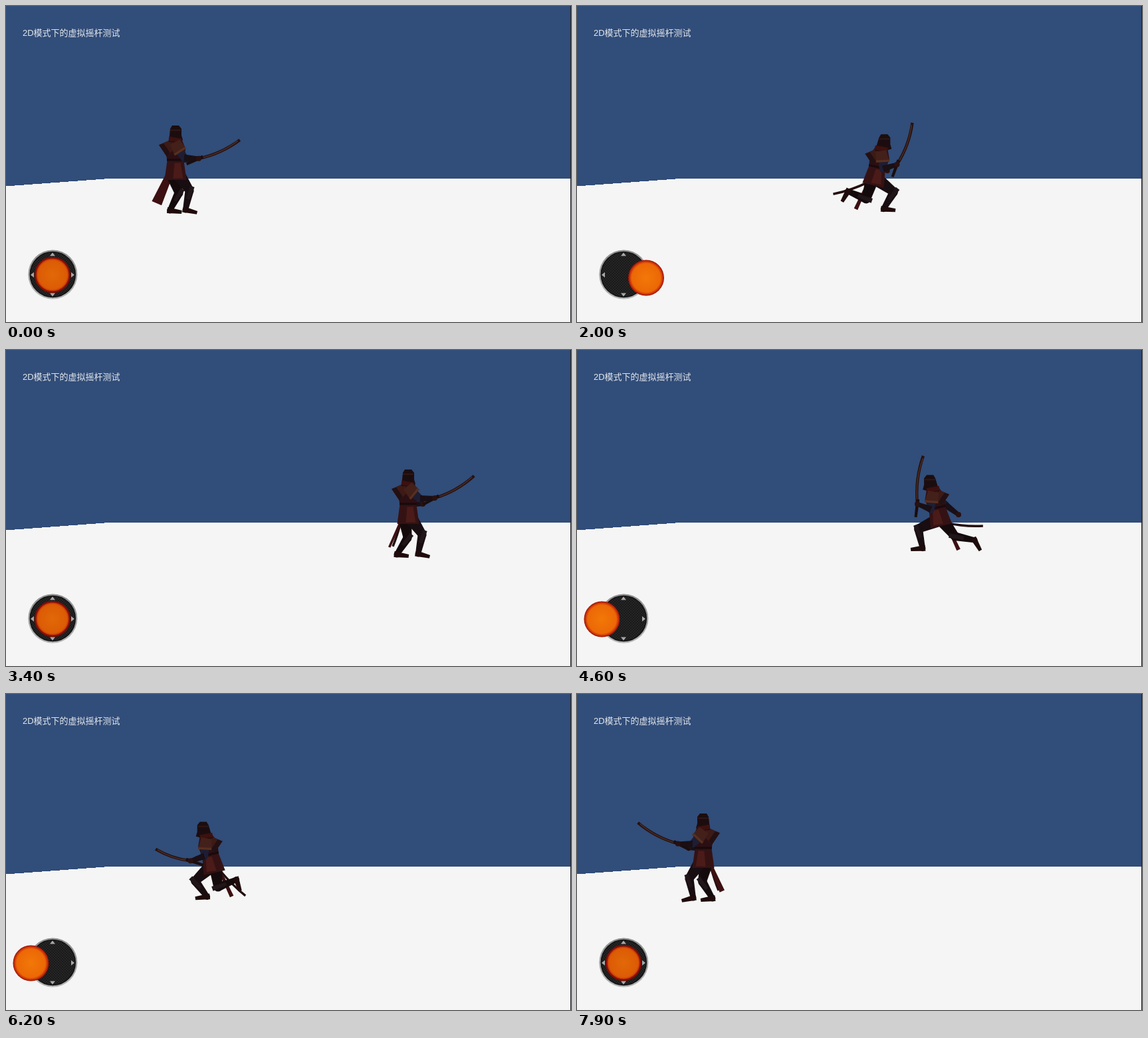
These frames come from a looping animation (850x476 px, 8 s). An HTML page with a canvas:

```html
<!DOCTYPE html>
<html lang="zh-CN">
<head>
<meta charset="utf-8">
<title>虚拟摇杆</title>
<style>
  html, body { margin: 0; width: 100%; height: 100%; overflow: hidden; background: #314d79; }
  svg, canvas { position: absolute; left: 0; top: 0; width: 850px; height: 476px; }
  text { font: 13px "Liberation Sans", "Noto Sans CJK SC", "Noto Sans CJK", sans-serif; fill: #e6e9ee; }
</style>
</head>
<body>
<svg viewBox="0 0 850 476">
  <defs>
    <radialGradient id="orange">
      <stop offset="0" stop-color="#f27808"/>
      <stop offset=".8" stop-color="#ec6806"/>
      <stop offset=".9" stop-color="#d03a08"/>
      <stop offset="1" stop-color="#980e06"/>
    </radialGradient>
    <linearGradient id="rim" x1="0" y1="0" x2="0" y2="1">
      <stop offset="0" stop-color="#8e8e8e"/>
      <stop offset="1" stop-color="#b4b4b4"/>
    </linearGradient>
    <pattern id="mesh" width="4" height="4" patternUnits="userSpaceOnUse">
      <rect width="4" height="4" fill="#191919"/>
      <path d="M0 0h2v2h-2zM2 2h2v2h-2z" fill="#262626"/>
    </pattern>
  </defs>
  <rect width="850" height="476" fill="#314d79"/>
  <path d="M0 271.5L155 260H850V476H0Z" fill="#f5f5f5" shape-rendering="crispEdges"/>
  <rect x="849" width="1" height="476" fill="#1d2026"/>
  <text x="25" y="45">2D模式下的虚拟摇杆测试</text>
  <circle cx="70.3" cy="404.5" r="37" fill="url(#rim)"/>
  <circle cx="70.3" cy="404.5" r="34" fill="url(#mesh)" stroke="#111" stroke-width="1.5"/>
  <path d="M66 376.5h8l-4-5zM66 432.5h8l-4 5zM42 401v8l-5-4zM98 401v8l5-4z" fill="#a9a9a9"/>
  <g id="knob">
    <circle r="27" fill="url(#orange)"/>
    <g id="dim">
      <circle r="27" fill="#8a1c00" opacity=".16"/>
      <circle r="25.8" fill="none" stroke="#7a0a06" stroke-width="2.6" opacity=".75"/>
    </g>
  </g>
</svg>
<canvas id="stage" width="850" height="476"></canvas>
<script>
const ctx = document.getElementById('stage').getContext('2d');
const knob = document.getElementById('knob');
const dim = document.getElementById('dim');

const TURN = 4300;
const WALK = [[950, 255], [2850, 605], [TURN, 605], [4600, 545], [5600, 383], [7200, 190]];

const { PI, cos, sin, hypot } = Math;
const lerp = (a, b, k) => a + (b - a) * k;
const ramp = (t, a, b) => Math.min(1, Math.max(0, (t - a) / (b - a)));
const pulse = (t, on, off, fade) => ramp(t, on, on + fade) - ramp(t, off, off + fade);
const along = (a, b, k) => [lerp(a[0], b[0], k), lerp(a[1], b[1], k)];
const shift = (p, x, y) => [p[0] + x, p[1] + y];
const polar = (p, deg, len) => shift(p, len * cos(deg * PI / 180), len * sin(deg * PI / 180));

function walkX(t) {
  let i = 0;
  while (i < WALK.length - 2 && t > WALK[i + 1][0]) i++;
  const [[t0, x0], [t1, x1]] = WALK.slice(i);
  return lerp(x0, x1, ramp(t, t0, t1));
}

// Middle joint of a limb with two equal bones; side 1 bends forward, -1 bends back.
function joint(a, b, bone, side) {
  const dx = b[0] - a[0], dy = b[1] - a[1], d = hypot(dx, dy);
  const out = side * Math.sqrt(Math.max(0, bone * bone - d * d / 4)) / d;
  return shift(along(a, b, .5), dy * out, -dx * out);
}

// Poses face right; x is measured from the body, angles run clockwise in degrees.
function idlePose(t) {
  const b = cos((Math.max(t, 800) - 3400) / 1600 * 2 * PI);
  return {
    hipY: 248, lean: 0, torso: 47, headX: 0,
    handX: 37 + 3 * b, handY: 227 - 4 * b, bladeAngle: -26.5 - 3 * b, bladeLen: 68,
    farX: 22, farY: 232, clothAngle: 114, clothWidth: 9 - 6 * b, sheathAngle: 108, sheathLen: 42,
    nearX: 15, nearY: 307, nearPitch: 14, rearX: -12 - 5 * b, rearY: 308, rearPitch: 8
  };
}

// Ankle path over a two-stride cycle: a flat sweep back, then a lifted return.
const footX = p => -14 + 42 * cos(PI * (p - .12));
const footY = p => 306 - 13.5 * (1 - cos(PI * (p - .35)));
const footPitch = p => 5 + 35 * (1 - cos(PI * (p - .2))) ** 2;

function runPose(t) {
  const p = t < TURN ? .4 + (t - 2000) / 360 : (t - 4600) / 360;
  const swing = cos((t - 4600) / 680 * 2 * PI);
  return {
    hipY: 253.5 + 4.5 * cos(2 * PI * (p - .3)), lean: 13, torso: 44, headX: 4,
    handX: 33, handY: 244 - 12 * swing, bladeAngle: -48 - 49 * swing, bladeLen: 62 + 11 * swing,
    farX: 23 - 52 * Math.max(0, swing) ** 3, farY: 248, clothAngle: 115, clothWidth: 5,
    sheathAngle: 150 + 25 * swing, sheathLen: 56,
    nearX: footX(p), nearY: footY(p), nearPitch: footPitch(p),
    rearX: footX(p + 1), rearY: footY(p + 1), rearPitch: footPitch(p + 1)
  };
}

function poseAt(t) {
  const a = idlePose(t), b = runPose(t);
  const k = pulse(t, 900, 2800, 150) + pulse(t, TURN, 7150, 150);
  return Object.fromEntries(Object.keys(a).map(name => [name, lerp(a[name], b[name], k)]));
}

function shape(pts, color) {
  ctx.fillStyle = color;
  ctx.beginPath();
  pts.forEach(p => ctx.lineTo(...p));
  ctx.fill();
}

function limb(a, b, wa, wb, color) {
  const len = hypot(b[0] - a[0], b[1] - a[1]) || 1;
  const nx = (a[1] - b[1]) / len / 2, ny = (b[0] - a[0]) / len / 2;
  shape([shift(a, nx * wa, ny * wa), shift(b, nx * wb, ny * wb),
    shift(b, -nx * wb, -ny * wb), shift(a, -nx * wa, -ny * wa)], color);
}

function dot([x, y], r, color) {
  ctx.fillStyle = color;
  ctx.beginPath();
  ctx.arc(x, y, r, 0, 7);
  ctx.fill();
}

function curve(a, c, b, width, color) {
  ctx.strokeStyle = color;
  ctx.lineWidth = width;
  ctx.beginPath();
  ctx.moveTo(...a);
  ctx.quadraticCurveTo(...c, ...b);
  ctx.stroke();
}

function leg(hip, ankle, pitch, color) {
  const knee = joint(hip, ankle, 30, 1);
  limb(hip, knee, 20, 13, color);
  dot(knee, 6.5, color);
  limb(knee, ankle, 13, 8, color);
  limb(shift(along(knee, ankle, -.2), 3, 0), along(knee, ankle, .45), 7, 5, '#20161a');
  dot(ankle, 4.5, '#160a0b');
  limb(polar(ankle, pitch + 180, 4), polar(ankle, pitch, 18), 9, 5, '#1f0b0b');
}

function arm(shoulder, hand, color) {
  const elbow = joint(shoulder, hand, 22, -1);
  limb(shoulder, elbow, 15, 11, color);
  dot(elbow, 5.5, color);
  limb(elbow, hand, 10, 6, '#190f14');
  dot(hand, 4, '#28110f');
  return elbow;
}

function sword(hand, angle, len) {
  const tip = polar(hand, angle, len);
  const bend = polar(along(hand, tip, .5), angle + 90, len * .11);
  curve(hand, bend, tip, 4.4, '#26120f');
  curve(hand, bend, along(hand, tip, .95), 1.4, '#4e2e27');
  limb(polar(hand, angle, -20), polar(hand, angle, 7), 4, 5, '#1a0d0e');
}

function hero(q) {
  const hip = [0, q.hipY], neck = polar(hip, q.lean - 90, q.torso), head = shift(neck, q.headX, -12);
  const hand = [q.handX, q.handY], shoulder = shift(neck, 1, 9);
  const spine = k => along(neck, hip, k);
  const back = shift(hip, -10, 8);

  const sheath = polar(back, q.sheathAngle, q.sheathLen);
  curve(back, shift(along(back, sheath, .5), 0, 4), sheath, 3.4, '#220d0e');
  limb(back, polar(back, q.clothAngle, 45), Math.max(4, q.clothWidth * .8), q.clothWidth * 1.2, '#3d1011');
  arm(shoulder, [q.farX, q.farY], '#1b1828');

  leg(shift(hip, -5, 5), [q.rearX, q.rearY], q.rearPitch, '#140a0c');
  leg(shift(hip, 4, 5), [q.nearX, q.nearY], q.nearPitch, '#180d10');

  // coat, from hem to collar
  limb(spine(.68), spine(1.3), 25, 33, '#341214');
  limb(shift(spine(.75), 3, 0), shift(spine(1.25), 4, 0), 9, 15, '#4a1b18');
  limb(neck, spine(.3), 19, 30, '#301013');
  limb(spine(.3), spine(.7), 30, 25, '#2b0f13');
  limb(spine(.62), spine(.69), 26, 26, '#180a0d');
  limb(shift(neck, -3, 6), shift(neck, -19, 17), 14, 21, '#3c1a16');
  limb(shift(neck, -13, 13), shift(neck, -19, 17), 17, 21, '#221013');

  shape([shift(head, -8, -4), shift(head, -5, -9), shift(head, 5, -9), shift(head, 9, -4),
    shift(head, 9, 6), shift(head, 11, 13), shift(neck, 5, 4), shift(neck, -10, 4)], '#1b0d0f');
  limb(shift(head, -8, -2), shift(head, 8, -2), 2, 2, '#2f1614');
  limb(shift(neck, -10, -1), shift(neck, 9, 2), 7, 6, '#3c110f');

  sword(hand, q.bladeAngle, q.bladeLen);
  const elbow = arm(shoulder, hand, '#1e1d34');
  limb(shift(neck, -1, 4), along(shoulder, elbow, .5), 16, 20, '#43201a');
  limb(along(shoulder, elbow, .4), along(shoulder, elbow, .55), 20, 20, '#57301f');
}

function draw(now) {
  const t = Math.floor(now % 8000 / 100) * 100;
  const right = pulse(t, 800, 2700, 200), left = pulse(t, 4250, 7100, 200);
  knob.setAttribute('transform', `translate(${70 + 34 * right - 32.5 * left} ${405 + 4.5 * right + .5 * left})`);
  dim.style.display = right || left ? 'none' : '';

  ctx.setTransform(1, 0, 0, 1, 0, 0);
  ctx.clearRect(0, 0, 850, 476);
  ctx.setTransform(t < TURN ? 1 : -1, 0, 0, 1, walkX(t), 0);
  hero(poseAt(t));
}

const start = performance.now();
function tick() {
  draw(performance.now() - start);
  requestAnimationFrame(tick);
}
tick();
</script>
</body>
</html>
```
